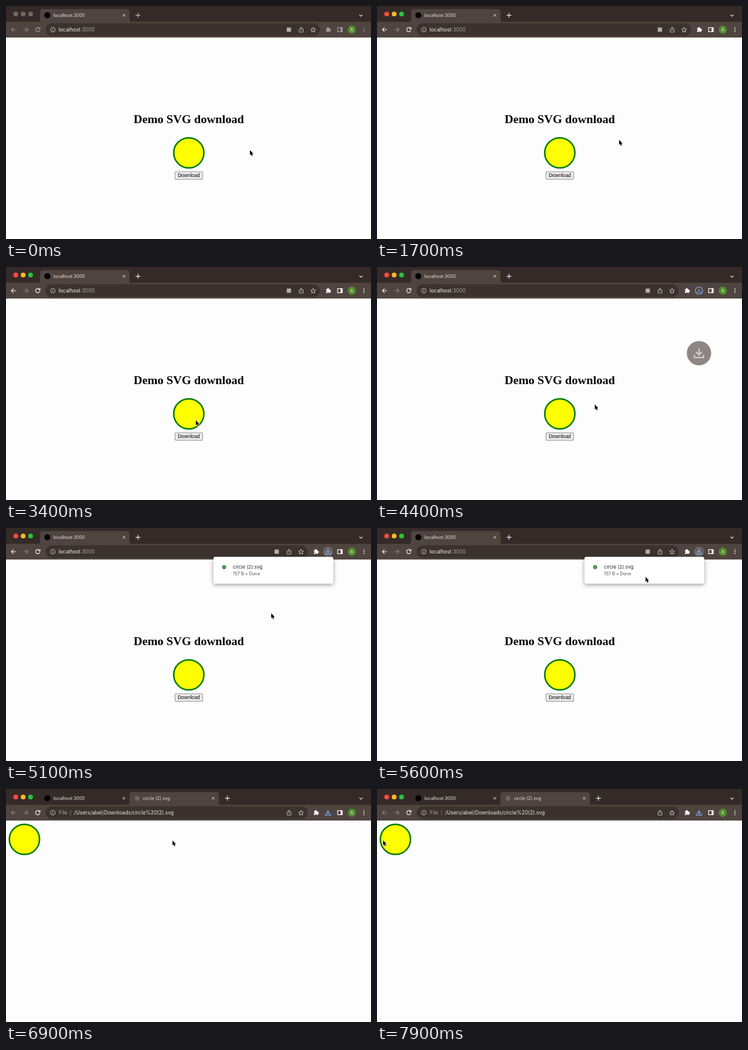
An HTML page with a canvas that plays this animation: 600x384 px, repeating every 8000 ms.

```html
<!DOCTYPE html>
<html lang="en">
<head>
<meta charset="utf-8">
<title>SVG download demo</title>
<style>
html, body { margin: 0; width: 100%; height: 100%; overflow: hidden; background: #fdfdfd; }
canvas { display: block; width: 600px; height: 384px; }
</style>
</head>
<body>
<canvas id="stage"></canvas>
<script>
const W = 600, H = 384, LOOP = 8000, STEP = 100;
const UI = 'Inter, Roboto, sans-serif';
const STRIP = '#342b28', BAR = '#4f443f', PILL = '#3b322e', LIGHT = '#e9e5e2', DIM = '#8f8783', BLUE = '#7fa9f0';

// Moments at which the scene changes, in ms
const AT = { active: 500, press: 3800, release: 3900, saved: 4100, fly: 4280, popup: 4900, picked: 5900, opened: 6300 };

// Pointer path: time, x, y
const PATH = [
  [0, 401, 237.5], [100, 401, 237.5], [400, 401, 237.5], [700, 401, 235], [800, 401, 235],
  [1700, 398, 220.5], [2300, 320, 278], [2600, 316, 274], [2700, 316, 274], [3100, 318, 250],
  [3400, 312, 252.5], [3600, 308, 270], [3800, 304, 282], [4000, 305, 282], [4400, 358, 226.5],
  [4800, 414, 166], [5100, 436, 140.5], [5500, 441, 84], [5600, 441.5, 80.5], [6700, 441.5, 80.5],
  [7200, 22, 91], [7300, 22, 91], [7900, 10, 84.5]
];

const canvas = document.getElementById('stage');
const ctx = canvas.getContext('2d');
const ratio = window.devicePixelRatio || 1;
canvas.width = W * ratio;
canvas.height = H * ratio;

function box(x, y, w, h, r, fill) {
  ctx.beginPath();
  ctx.roundRect(x, y, w, h, r);
  ctx.fillStyle = fill;
  ctx.fill();
}

function disc(x, y, r, fill) {
  ctx.beginPath();
  ctx.arc(x, y, r, 0, Math.PI * 2);
  ctx.fillStyle = fill;
  ctx.fill();
}

function ring(x, y, r, color, width = 1) {
  ctx.beginPath();
  ctx.arc(x, y, r, 0, Math.PI * 2);
  ctx.strokeStyle = color;
  ctx.lineWidth = width;
  ctx.stroke();
}

// Strokes SVG path data around a centre
function icon(x, y, d, color, width = 1, scale = 1) {
  ctx.save();
  ctx.translate(x, y);
  ctx.scale(scale, scale);
  ctx.strokeStyle = color;
  ctx.lineWidth = width;
  ctx.stroke(new Path2D(d));
  ctx.restore();
}

function text(str, x, y, font, color, align = 'left') {
  ctx.font = font;
  ctx.fillStyle = color;
  ctx.textAlign = align;
  ctx.fillText(str, x, y);
}

const SHAPES = {
  cross: 'M-2-2L2 2M2-2L-2 2',
  plus: 'M-4 0H4M0-4V4',
  chevron: 'M-2.5-1.2L0 1.3L2.5-1.2',
  back: 'M4 0H-3.5M0-3.7L-3.7 0L0 3.7',
  forward: 'M-4 0H3.5M0-3.7L3.7 0L0 3.7',
  reload: 'M3.2 1.3A3.5 3.5 0 1 1 2.6-2.4M3.7-4V-1.2H.8',
  share: 'M-1.3-1.2H-3.2V4H3.2V-1.2H1.3M0 1.6V-4M-1.8-2.4L0-4.2L1.8-2.4',
  star: 'M0-4L1.2-1.3L4.1-1L1.9.9L2.6 3.8L0 2.3L-2.6 3.8L-1.9.9L-4.1-1L-1.2-1.3Z',
  panel: 'M-3.8-3.3H3.8V3.3H-3.8Z',
  save: 'M0-4.5V1.4M-2.8-1.2L0 1.6L2.8-1.2M-4.3 1.6V4.2H4.3V1.6'
};

function tabShape(x) {
  ctx.fillStyle = BAR;
  ctx.fill(new Path2D(`M${x - 4} 27Q${x} 27 ${x} 22V10Q${x} 5 ${x + 5} 5H${x + 142}Q${x + 147} 5 ${x + 147} 10V22Q${x + 147} 27 ${x + 151} 27Z`));
}

function tabs(active, opened) {
  box(0, 0, W, 27, 0, STRIP);
  const lights = active ? ['#fb4b40', '#fdb924', '#2bc33f'] : ['#716865', '#716865', '#716865'];
  lights.forEach((c, i) => disc(16 + i * 12.2, 13.2, 3.9, c));
  tabShape(opened ? 203 : 56);
  disc(68, 15.3, 5, '#000');
  text('localhost:3000', 78, 18, `7.3px ${UI}`, LIGHT);
  icon(193.7, 15.3, SHAPES.cross, LIGHT);
  if (opened) {
    disc(215.5, 15.3, 4, '#6d6562');
    text('circle (2).svg', 225, 18, `7.2px ${UI}`, LIGHT);
    icon(340.5, 15.3, SHAPES.cross, LIGHT);
  }
  icon(opened ? 364 : 217, 15.3, SHAPES.plus, active ? LIGHT : '#bcb5b1', 1.2);
  icon(583.5, 15.5, SHAPES.chevron, LIGHT, 1.2);
}

function puzzle(x, y, color) {
  box(x - 4, y - 2.4, 6.6, 6.4, 0.8, color);
  disc(x - 0.6, y - 2.7, 1.6, color);
  disc(x + 2.8, y + 0.7, 1.6, color);
  disc(x - 4, y + 0.8, 1.2, BAR);
  disc(x - 0.6, y + 4, 1.2, BAR);
}

function downloadButton(t) {
  if (t >= AT.popup && t < AT.opened) disc(529.3, 39, 8.5, '#6b615d');
  if (t < AT.popup) {
    ring(529.3, 39, 6, BLUE, 1.2);
    icon(529.3, 39, SHAPES.save, BLUE, 1.4, 0.65);
  } else {
    icon(529.3, 39, SHAPES.save, BLUE, 1.3);
  }
}

function toolbar(t, active, opened) {
  const saved = t >= AT.saved;
  const fg = active ? '#f7f5f3' : '#a19995';
  const shift = saved ? 20 : 0;
  box(0, 26, W, 26, 0, BAR);
  box(0, 51.4, W, 0.6, 0, '#6a605b');
  icon(12.5, 39, SHAPES.back, active && !opened ? fg : DIM, 1.1);
  icon(32.5, 39, SHAPES.forward, DIM, 1.1);
  icon(52.3, 39, SHAPES.reload, fg, 1.2);

  box(65, 28.5, 451 - shift, 21, 10.5, PILL);
  ring(77, 39, 3.9, '#c5bfbb', 0.9);
  box(76.5, 38.5, 1, 2.8, 0, '#c5bfbb');
  box(76.5, 36.7, 1, 1, 0, '#c5bfbb');
  const font = `8.4px ${UI}`;
  if (opened) {
    text('File', 87, 42, font, '#aaa39f');
    box(105.7, 34.5, 0.8, 9, 0, '#837b77');
    text('/Users/abel/Downloads/circle%20(2).svg', 112, 42, font, LIGHT);
  } else {
    text('localhost', 86.5, 42, font, '#f4f1ef');
    const w = ctx.measureText('localhost').width;
    text(':3000', 86.5 + w, 42, font, '#aaa39f');
    box(461.5 - shift, 35.5, 7, 7, 0, '#b5aeaa');
  }
  icon(485.3 - shift, 39, SHAPES.share, '#c5bfbb', 0.9);
  icon(505 - shift, 39.2, SHAPES.star, '#d6d1cd', 0.9);

  puzzle(saved ? 510 : 530, 39, fg);
  if (saved) downloadButton(t);
  icon(549, 39, SHAPES.panel, fg, 1.2);
  box(550, 35.7, 3, 6.6, 0, fg);
  disc(568.5, 39, 6.7, '#528d2b');
  text('A', 568.5, 41.5, `7px ${UI}`, '#fff', 'center');
  for (const dy of [-3.2, 0, 3.2]) disc(588.3, 39 + dy, 0.9, fg);
}

function yellowCircle(x, y) {
  disc(x, y, 24.8, '#ffff00');
  ring(x, y, 24.8, '#007a0a', 2.5);
}

function page(t) {
  text('Demo SVG download', 300.5, 193.3, 'bold 19.7px "Liberation Serif", serif', '#000', 'center');
  yellowCircle(300.5, 242);
  const down = t >= AT.press && t < AT.release;
  box(277.5, 272.8, 46, 13.2, 2, '#6f6f6f');
  box(278.3, 273.6, 44.4, 11.6, 1.4, down ? '#f5f5f5' : '#efefef');
  text('Download', 300.5, 282.2, '8.25px "Liberation Sans", sans-serif', '#000', 'center');
}

// Badge that rises towards the toolbar, fading in and out
function badge(t) {
  const v = (t - AT.fly) / 600;
  if (v <= 0 || v >= 1) return;
  const y = 142 - 60 * (v - 0.2);
  ctx.save();
  ctx.globalAlpha = 1 - 4 * (v - 0.5) ** 2;
  disc(529.3, y, 20, BAR);
  icon(529.3, y, SHAPES.save, '#fff', 1.15, 1.75);
  ctx.restore();
}

function popup() {
  ctx.save();
  ctx.shadowColor = 'rgba(0,0,0,.38)';
  ctx.shadowBlur = 7 * ratio;
  ctx.shadowOffsetY = 2 * ratio;
  box(341, 47.5, 197, 44.2, 3, '#fff');
  ctx.restore();
  disc(358.6, 64.5, 3.4, '#4b9650');
  text('circle (2).svg', 373, 66.7, `7.9px ${UI}`, '#26272a');
  text('157 B • Done', 373, 78.3, `7.3px ${UI}`, '#55585d');
}

function pointer(t) {
  let i = PATH.findIndex(p => p[0] > t);
  if (i < 0) i = PATH.length - 1;
  const [t0, x0, y0] = PATH[i - 1], [t1, x1, y1] = PATH[i];
  const k = Math.min(1, (t - t0) / (t1 - t0));
  ctx.save();
  ctx.translate(x0 + (x1 - x0) * k, y0 + (y1 - y0) * k);
  const arrow = new Path2D('M0 0V8.3L1.8 6.7L3.1 9.8L4.6 9.2L3.3 6.2H5.7Z');
  ctx.lineJoin = 'round';
  ctx.strokeStyle = '#fff';
  ctx.lineWidth = 1.3;
  ctx.stroke(arrow);
  ctx.fillStyle = '#000';
  ctx.fill(arrow);
  ctx.restore();
}

function draw(t) {
  const active = t >= AT.active, opened = t >= AT.opened;
  ctx.setTransform(ratio, 0, 0, ratio, 0, 0);
  box(0, 0, W, H, 0, '#fdfdfd');
  tabs(active, opened);
  toolbar(t, active, opened);
  if (opened) yellowCircle(30.3, 83);
  else page(t);
  badge(t);
  if (t >= AT.popup && t < AT.picked) popup();
  pointer(t);
}

const start = performance.now();
function tick() {
  const t = (performance.now() - start) % LOOP;
  draw(Math.floor(t / STEP) * STEP);
  requestAnimationFrame(tick);
}
tick();
</script>
</body>
</html>
```
